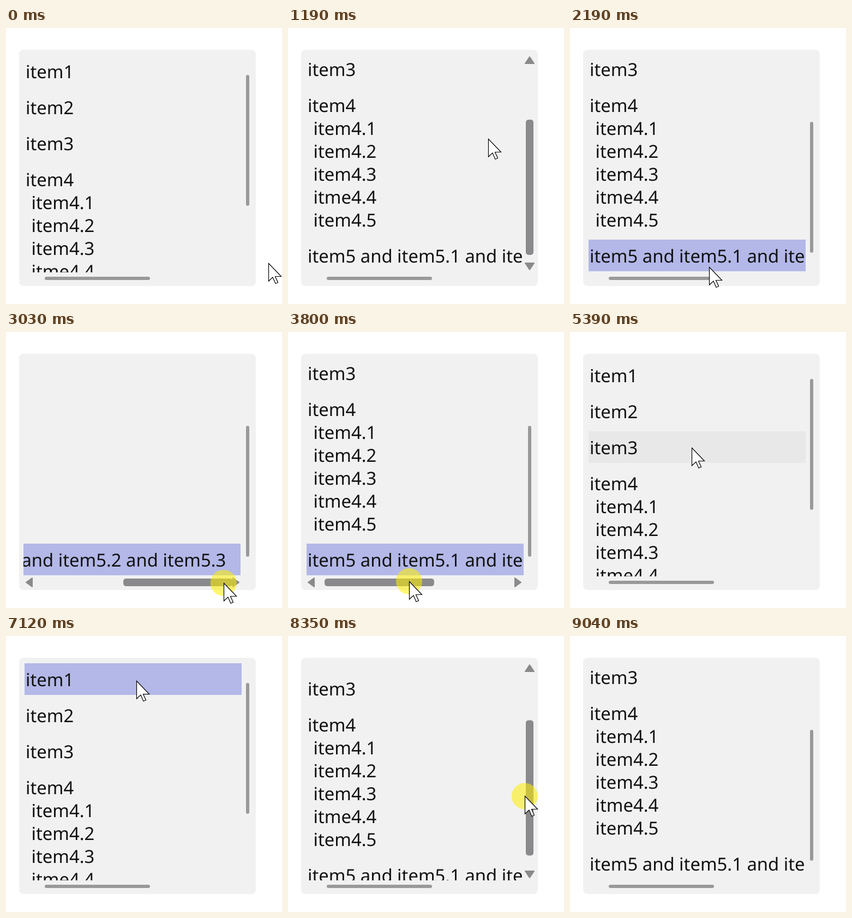
Write an HTML page that moves like this. It is 506 px wide and 506 px high and loops after 9610 ms.

```html
<!DOCTYPE html>
<html lang="en">
<head>
<meta charset="utf-8">
<title>Scrolling list</title>
<style>
  html, body { margin: 0; width: 100%; height: 100%; overflow: hidden; background: #fff; }
  svg { display: block; width: 506px; height: 506px; }
  text { font: 32.8px "Noto Sans", "Open Sans", sans-serif; fill: #111; white-space: pre; text-rendering: geometricPrecision; }
</style>
</head>
<body>
<svg viewBox="0 0 506 506" xmlns="http://www.w3.org/2000/svg">
  <defs><clipPath id="view"><rect x="32" y="48" width="400" height="400"/></clipPath></defs>
  <rect x="24" y="40" width="434" height="433" rx="8" fill="#f1f1f1"/>
  <g clip-path="url(#view)"><g id="list"></g></g>
  <g fill="#8a8a8c" stroke="#8a8a8c" stroke-width="2" stroke-linejoin="round">
    <path id="vArrows" d="M443 53l8 12h-16zM443 443l8-12h-16z"/>
    <path id="hArrows" d="M37 459l11-8v16zM427 459l-11-8v16z"/>
  </g>
  <rect id="vThumb"/>
  <rect id="hThumb"/>
  <circle id="press" r="24" fill="#fff000" fill-opacity=".55"/>
  <path id="cursor" d="M.5 .5V33L8 26L13 37.5L17.5 35.5L12.5 24.5H23.5Z" fill="#fff" stroke="#000" stroke-width="1.2"/>
</svg>
<script>
(() => {
  const LOOP = 9610, MAX_V = 136, MAX_H = 296, V_RATIO = 0.632, H_RATIO = 0.5;
  const $ = id => document.getElementById(id);
  const clamp = (v, lo, hi) => Math.min(hi, Math.max(lo, v));
  const within = (t, from, to) => t >= from && t < to;
  const easeOut = u => 1 - (1 - clamp(u, 0, 1)) ** 1.8;

  function set(el, attrs) {
    for (const key in attrs) el.setAttribute(key, attrs[key]);
  }
  const show = (el, on) => set(el, { visibility: on ? "visible" : "hidden" });

  function add(tag, attrs, label) {
    const el = document.createElementNS("http://www.w3.org/2000/svg", tag);
    set(el, attrs);
    if (label) el.textContent = label;
    return $("list").appendChild(el);
  }

  // Each entry is a row; further lines are its sub-items.
  const items = [
    ["item1"], ["item2"], ["item3"],
    ["item4", "item4.1", "item4.2", "item4.3", "itme4.4", "item4.5"],
    ["item5 and item5.1 and item5.2 and item5.3"]
  ];
  let nextY = 50;
  const rows = items.map(lines => {
    const y = nextY, height = lines.length * 42 + 16;
    const el = add("rect", { x: 34, y, width: 692, height });
    lines.forEach((line, i) => add("text", { x: i ? 46.5 : 36, y: y + 42 + i * 42 }, line));
    nextY += height + 8;
    return { y, height, el };
  });

  // Pointer moves: start, end, x, y. It rests in between.
  const moves = [
    [390, 690, 443, 300], [750, 1000, 443, 386], [1040, 1330, 340, 136],
    [1630, 1950, 270, 392], [2060, 2310, 250, 455],
    [2640, 3060, 400, 460], [3390, 3790, 222, 457], [3850, 4320, 190, 410],
    [5020, 5780, 237, 128], [6420, 6570, 238, 82], [7120, 7720, 444, 221],
    [8080, 8510, 432, 308], [8520, 9040, 510, 510]
  ];
  const vDrags = [{ from: 750, to: 1040, grab: 300 }, { from: 8080, to: 8520, grab: 221 }];
  const hDrag = { from: 2640, to: 3850, grab: 250 };
  const clicks = [{ from: 1960, to: 2060 }, { from: 6740, to: 6880 }];
  const presses = [...vDrags, hDrag, ...clicks];

  function pointer(t) {
    let x = 481, y = 431;
    for (const [from, to, nx, ny] of moves) {
      const u = easeOut((t - from) / (to - from));
      x += (nx - x) * u;
      y += (ny - y) * u;
    }
    return { x, y };
  }

  // A drag keeps its last offset after release.
  function dragged(t, drag, axis, ratio, max) {
    if (t < drag.from) return 0;
    return clamp((pointer(Math.min(t, drag.to))[axis] - drag.grab) / ratio, 0, max);
  }

  function scrollTop(t) {
    const drag = vDrags[t < 4790 ? 0 : 1];
    return dragged(t, drag, "y", V_RATIO, MAX_V) * (t < 4790 ? 1 - easeOut((t - 4550) / 240) : 1);
  }

  // Scrollbars widen shortly before a drag and shrink after it.
  const isWide = (t, drag) => within(t, drag.from - 110, drag.to + 200);

  function bar(thumb, arrows, wide, start, length, vertical) {
    const inset = wide ? 0 : 4, size = wide ? 14 : 6;
    const at = start + inset, len = length - 2 * inset, side = (vertical ? 443 : 459) - size / 2;
    set(thumb, vertical
      ? { x: side, y: at, width: size, height: len }
      : { x: at, y: side, width: len, height: size });
    set(thumb, { rx: wide ? 5 : 3, fill: wide ? "#8a8a8c" : "#999" });
    show(arrows, wide);
  }

  function draw(t) {
    const { x, y } = pointer(t);
    const sy = scrollTop(t), sx = dragged(t, hDrag, "x", H_RATIO, MAX_H);
    const vWide = vDrags.some(d => isWide(t, d)), hWide = isWide(t, hDrag);

    set($("list"), { transform: `translate(${-Math.round(sx)} ${-Math.round(sy)})` });
    const selected = t < clicks[0].from ? -1 : t < clicks[1].from ? 4 : 0;
    const inside = within(x, 34, 432) && within(y, 48, 448) && !vWide && !hWide;
    rows.forEach((row, i) => {
      const hover = inside && within(y + sy - row.y, 0, row.height);
      set(row.el, { fill: i === selected ? "#b3b8e8" : hover ? "#e8e8e8" : "none" });
    });

    bar($("vThumb"), $("vArrows"), vWide, 82 + sy * V_RATIO, 248, true);
    bar($("hThumb"), $("hArrows"), hWide, 67 + sx * H_RATIO, 201, false);

    set($("press"), { cx: x, cy: y });
    show($("press"), presses.some(p => within(t, p.from, p.to)));
    set($("cursor"), { transform: `translate(${Math.round(x)} ${Math.round(y)})` });
  }

  const begin = performance.now();
  function tick() {
    draw(Math.max(0, performance.now() - begin) % LOOP);
    requestAnimationFrame(tick);
  }
  tick();
})();
</script>
</body>
</html>
```
